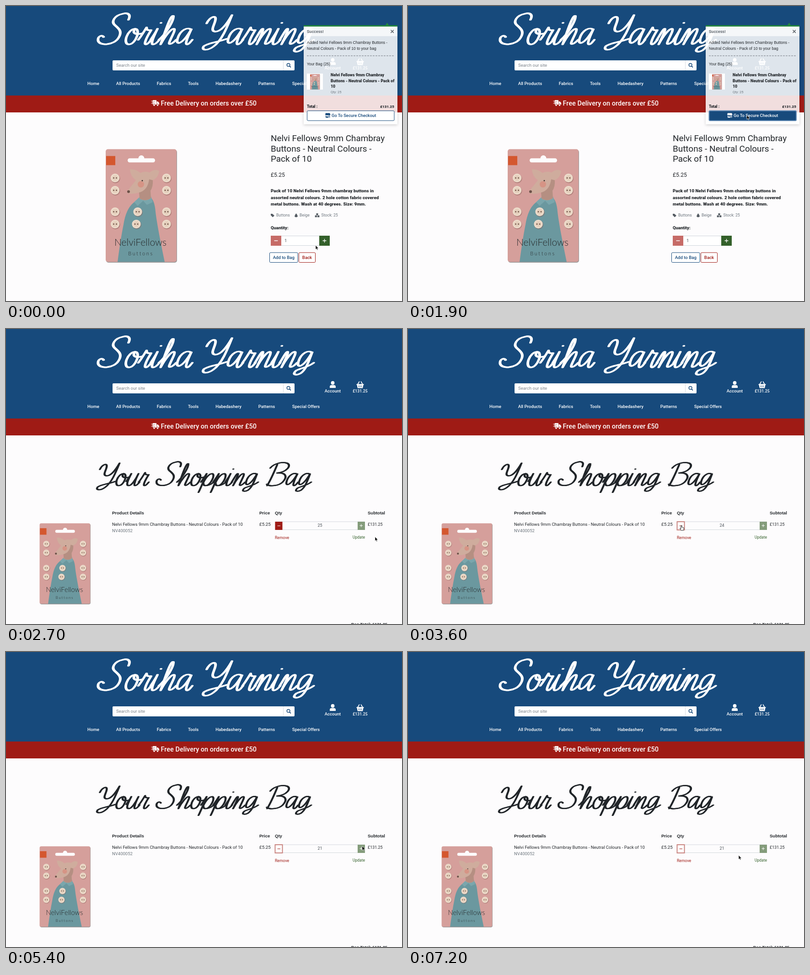
Recreate the animation shown at these times as an HTML page. Size 866x646 px, loop 7300 ms.

```html
<!DOCTYPE html>
<html lang="en">
<head>
<meta charset="utf-8">
<title>Shopping bag</title>
<style>
html, body { margin: 0; width: 100%; height: 100%; overflow: hidden; background: #fdfcfd; }
svg { display: block; font-family: Roboto, sans-serif; }
.sans { font-family: "Liberation Sans", Arial, sans-serif; }
.b { font-weight: 700; }
.x { font-weight: 800; }
.m { font-weight: 500; }
.mid { text-anchor: middle; }
.end { text-anchor: end; }
.script path { fill: none; stroke: currentColor; stroke-linecap: round; stroke-linejoin: round; }
.line { fill: none; stroke: currentColor; stroke-linecap: round; stroke-linejoin: round; }
#checkout { color: #174a7c; }
#checkout rect { fill: #fff; stroke: #174a7c; }
#checkout.hover { color: #fff; }
#checkout.hover rect { fill: #174a7c; }
#checkout.focus rect { stroke: #5d87b3; stroke-width: 2; }
#minus { color: #fff; }
#minus rect { fill: #9f1b15; }
#minus.hover { color: #9f1b15; }
#minus.hover rect { fill: #fff; stroke: #9f1b15; }
#minus.focus rect { stroke: #c98480; stroke-width: 2; }
</style>
</head>
<body>
<script>
const BLUE = '#174a7c', RED = '#9f1b15', GREEN = '#33602a', INK = '#212529', GREY = '#6c757d';
const BRAND = 'Nelvi Fellows';

const text = (x, y, size, str, cls = '', fill = INK) =>
  `<text x="${x}" y="${y}" font-size="${size}" class="${cls}" fill="${fill}">${str}</text>`;
const rect = (x, y, w, h, fill, extra = '') =>
  `<rect x="${x}" y="${y}" width="${w}" height="${h}" fill="${fill}" ${extra}/>`;
const line = (d, color, width = 1.3) =>
  `<path class="line" d="${d}" style="color:${color}" stroke-width="${width}"/>`;
const shape = (d, fill, extra = '') => `<path d="${d}" fill="${fill}" ${extra}/>`;
const group = (x, y, scale, body) => `<g transform="translate(${x} ${y}) scale(${scale})">${body}</g>`;

// Pen lettering: advance width and upright stroke, baseline at y = 0
const glyphs = {
  S: [48, 'M44-54C46-66 38-70 30-67C16-64 12-50 22-42C32-34 40-28 36-14C32 2 6 4 0-8C-4-18 4-22 8-16'],
  Y: [44, 'M-2-46C0-60 10-65 12-55C14-44 8-30 18-28C30-27 36-46 40-64C38-36 36-8 24 5C15 15 3 13 6 4C12-3 30-5 44-12'],
  B: [46, 'M14-60C12-36 10-16 6 0M0-50C6-64 24-68 36-64C50-58 42-38 20-36C42-38 48-24 40-10C34 0 14 4 4-4'],
  a: [30, 'M23-32C15-39 3-32 3-13C3 3 15 2 23-33C20-12 20 0 24 0C27 0 29-5 31-10'],
  o: [26, 'M14-34C-1-34-1 0 11 0C24 0 25-34 13-34C10-24 20-20 29-24'],
  n: [31, 'M0-10C3-20 5-34 8-34C11-34 8-14 6 0C9-18 16-34 21-34C27-34 20-10 21-3C22 2 28-2 32-10'],
  u: [30, 'M0-12C2-20 5-26 6-34C3-16 1 0 9 0C16 0 21-18 23-34C20-14 20 0 24 0C27 0 30-5 32-10'],
  r: [23, 'M0-10C4-20 6-30 8-37C9-30 14-31 18-31C15-20 11 0 17 0C20 0 22-6 24-10'],
  i: [15, 'M0-10C2-18 5-26 6-34C3-14 2 0 7 0C11 0 14-5 16-10M9-47h.1'],
  h: [31, 'M0-10C8-20 17-50 13-62C8-66 7-40 6 0C9-18 16-34 21-34C27-34 20-10 21-3C22 2 28-2 32-10'],
  p: [29, 'M0-10C3-20 6-28 7-34C5-8 4 6 2 19M6-8C8-24 14-34 20-34C30-32 25 0 14 0C9 0 8-3 7-6M14 0C20 0 26-4 31-10'],
  g: [30, 'M23-32C15-39 3-32 3-13C3 3 15 2 23-33C22-10 21 6 14 13C6 19-2 15 4 7C10 2 24 0 32-10'],
  ' ': [20, '']
};
function script(str, x, y, sx, sy, color) {
  let pen = 0, strokes = '';
  for (const c of str) {
    const [width, d] = glyphs[c];
    for (const dx of [0, 1.6]) strokes += `<path d="${d}" transform="translate(${pen + dx})"/>`;
    pen += width;
  }
  return `<g class="script" role="img" aria-label="${str}" style="color:${color}" stroke-width="3.3"
    transform="translate(${x} ${y}) scale(${sx} ${sy}) skewX(-15)">${strokes}</g>`;
}

const button = ([x, y]) =>
  `<circle cx="${x + 1}" cy="${y + 1.5}" r="10" fill="#8a5f58" opacity=".45"/>
   <circle cx="${x}" cy="${y}" r="9.6" fill="#eddccb"/><circle cx="${x}" cy="${y}" r="6.5" fill="#e4cfbc"/>
   <circle cx="${x - 3}" cy="${y}" r="1.5" fill="#75594c"/><circle cx="${x + 3}" cy="${y}" r="1.5" fill="#75594c"/>`;
const rows = [63, 90, 137, 164];
const buttons = [...rows.flatMap(y => [[20.5, y], [133, y]]), [70, 137], [67, 164]];
const card = `<g id="card">
  ${rect(1, 1.5, 155, 247, '#999', 'rx="5"')}${rect(0, 0, 155, 247, '#d59f9b', 'rx="5"')}
  ${rect(48, 20, 60, 9, '#fdfcfd', 'rx="4.5"')}<circle cx="78" cy="20" r="6.5" fill="#fdfcfd"/>
  ${rect(1, 15, 20, 20, '#d4572f')}
  ${shape('M26 247Q32 200 39 165Q44 132 60 118L76 106H98Q107 112 109 137Q112 165 129 247Z', '#6b989f')}
  ${shape('M62 116L75 104L99 103L103 116L90 122L82 113L70 124Z', '#7aa6ac')}
  ${shape('M53 44Q65 43 76 52Q86 47 96 51Q108 42 117 48Q115 63 103 68Q104 82 98 91L99 107Q87 116 74 108L73 95Q60 99 49 97Q46 92 50 88L66 68Q54 60 53 44Z', '#cfac9d')}
  ${shape('M103 68Q104 82 98 91L99 107Q87 116 74 108L73 95Q92 90 95 66Z', '#b58f82')}
  <circle cx="77" cy="77" r="7" fill="#d98a7b" opacity=".7"/><circle cx="50" cy="93" r="3" fill="#6d5149"/>
  <circle cx="80" cy="69" r="1.4" fill="#3b302d"/>
  ${buttons.map(button).join('')}
  <g style="font-family:Lato,sans-serif;font-weight:300">${text(76, 211, 21, BRAND.replace(' ', ''), 'mid', '#25282a')}
  <g letter-spacing="2.6">${text(77, 232, 11, 'Buttons', 'mid', '#25282a')}</g></g>
</g>`;
const cardAt = (x, y, scale) => `<use href="#card" transform="translate(${x} ${y}) scale(${scale})"/>`;

const truck = `${shape('M3 0H11V10H3ZM11.6 3H14L17 6V10H11.6Z', '#fff')}
  <circle cx="6" cy="11" r="2.3" fill="#fff" stroke="${RED}"/><circle cx="13.5" cy="11" r="2.3" fill="#fff" stroke="${RED}"/>
  ${line('M0 2H6M1 4.7H6M0 7.4H5', '#fff', 1)}${line('M4.5 3.3H7M4.5 6H6', RED, .7)}`;
const basket = shape('M0 6H16V8H15L13.6 15H2.4L1 8H0Z', '#fff') +
  line('M3 6L6 .8M13 6L10 .8', '#fff', 1.7) + line('M5 9.5V12.5M8 9.5V12.5M11 9.5V12.5', BLUE, 1);
const store = shape('M1 0H10L11.5 3.5Q11 5 9.5 5Q8.5 5 7.6 4.4Q5.8 5.6 4 4.4Q2 5.5 0 3.5ZM1 5.5H2.2V7.5H6.5V5.5H7.5V10H1ZM9 5.5H10.3V10H9Z', 'currentColor');

const nav = [['Home', 191], ['All Products', 267], ['Fabrics', 345.5], ['Tools', 409.5],
  ['Habedashery', 486.5], ['Patterns', 570], ['Special Offers', 656]];
const header = `
  ${rect(0, 0, 866, 196, BLUE)}${rect(0, 196, 866, 37, RED)}
  ${script('Soriha Yarning', 198, 84, 1.18, 1, '#fff')}
  ${rect(233, 119, 398, 22, '#fff', 'rx="2"')}${rect(606, 119, 1, 22, '#d8dde2')}
  ${text(241, 132.5, 9.5, 'Search our site', '', '#7b838b')}
  <circle cx="617.6" cy="129" r="3.3" fill="none" stroke="${BLUE}" stroke-width="1.5"/>${line('M620.2 131.6L622.4 133.8', BLUE, 1.8)}
  <circle cx="714.5" cy="118" r="3.9" fill="#fff"/>${shape('M708 129V126.5Q708 122.8 712 122.8H717Q721 122.8 721 126.5V129Z', '#fff')}
  ${group(766.5, 114.5, 1, basket)}
  ${text(714.5, 139.3, 9.5, 'Account', 'm mid', '#fff')}${text(774.5, 139.3, 8.8, '£131.25', 'm mid', '#fff')}
  ${nav.map(([label, x]) => text(x, 172.6, 9.6, label, 'm mid', '#fff')).join('')}
  ${group(318, 206, 1, truck)}${text(338.5, 218, 14.5, 'Free Delivery on orders over £50', 'm', '#fff')}`;

const panel = `
  ${rect(651, 45, 205, 214, '#fff', 'opacity=".86" filter="url(#shadow)"')}
  ${rect(651, 45, 205, 21, '#fff', 'opacity=".7"')}
  ${rect(651, 42, 205, 3, '#23863f')}${shape('M830 42L833.5 36.5L837 42Z', '#23863f')}
  ${text(658, 59, 8.4, 'Success!', 'sans b', '#5a6168')}${line('M842 53L847.4 58.4M847.4 53L842 58.4', '#62686e', 1.7)}
  ${text(658, 83, 8.5, `Added ${BRAND} 9mm Chambray Buttons -`, 'sans')}
  ${text(658, 95.5, 8.5, 'Neutral Colours - Pack of 10 to your bag', 'sans')}
  <path d="M658 109H849" stroke="#959ca4" stroke-width="1.5" stroke-dasharray="4 2"/>
  ${text(658, 130, 8.3, 'Your Bag (25)', 'sans')}
  ${rect(658, 148, 35, 35, '#fff')}${cardAt(665, 149, .137)}
  ${[`${BRAND} 9mm Chambray`, 'Buttons - Neutral Colours - Pack of', '10']
    .map((s, i) => text(710, 154.3 + i * 12.3, 8.75, s, 'x')).join('')}
  ${text(710, 190.5, 7.6, 'Qty: 25', '', GREY)}
  ${text(658, 222.7, 8.3, 'Total :', 'x')}${text(849, 222.7, 8.1, '£131.25', 'x end')}
  <g id="checkout">${rect(658.5, 229.5, 190.5, 21.5, '#fff', 'rx="2"')}
    ${group(698, 234.5, 1, store)}${text(712, 243.2, 9.4, 'Go To Secure Checkout', 'm', 'currentColor')}</g>`;

const product = `<g id="product">
  ${cardAt(218, 313.5, 1)}
  ${[`${BRAND} 9mm Chambray`, 'Buttons - Neutral Colours -', 'Pack of 10']
    .map((s, i) => text(579, 296.3 + i * 22.5, 18.9, s)).join('')}
  ${text(579, 374, 12.2, '£5.25')}
  ${[`Pack of 10 ${BRAND} 9mm chambray buttons in`, 'assorted neutral colours. 2 hole cotton fabric covered', 'metal buttons. Wash at 40 degrees. Size: 9mm.']
    .map((s, i) => text(579, 408.3 + i * 14.2, 9.75, s, 'x')).join('')}
  ${shape('M579 455H582.5L587 459L583.3 462.5L579 458.3Z', '#555c63')}
  ${shape('M634.5 454Q641 462.5 634.5 462.5Q628 462.5 634.5 454Z', '#555c63')}
  ${shape('M678.5 454H682.5V458H678.5ZM675.7 458.6H680V462.6H675.7ZM681 458.6H685.4V462.6H681Z', '#555c63')}
  ${text(591, 461.3, 8.6, 'Buttons', '', GREY)}${text(642, 461.3, 8.8, 'Beige', '', GREY)}${text(689.5, 461.3, 8.8, 'Stock: 25', '', GREY)}
  ${text(579, 489, 9.4, 'Quantity:', 'x')}
  ${rect(579.5, 503.5, 128, 21, '#fff', 'stroke="#ced4da"')}
  ${rect(579, 503, 23, 22, '#c66b67')}${rect(685, 503, 23, 22, GREEN)}
  ${line('M587 514H594', '#fff')}${line('M693 514H700M696.5 510.5V517.5', '#fff')}
  ${text(609, 517, 9.5, '1', '', '#495057')}
  ${rect(576.5, 540, 61.5, 21.5, '#fff', `rx="2" stroke="${BLUE}"`)}${text(607.3, 553.5, 9.6, 'Add to Bag', 'm mid', BLUE)}
  ${rect(640.5, 540, 36, 21.5, '#fff', `rx="2" stroke="${RED}"`)}${text(658.5, 553.5, 9.6, 'Back', 'm mid', RED)}
  ${panel}</g>`;

const bag = `<g id="bag">
  ${script('Your Shopping Bag', 195, 343, .92, .77, INK)}
  ${cardAt(73.5, 425.5, .714)}
  ${[['Product Details', 232], ['Price', 554], ['Qty', 588], ['Subtotal', 791]]
    .map(([s, x]) => text(x, 405.5, 9.5, s, 'sans b')).join('')}
  ${text(232, 431.3, 9.5, `${BRAND} 9mm Chambray Buttons - Neutral Colours - Pack of 10`)}
  ${text(232, 445.3, 9.5, 'NV400052', '', GREY)}
  ${text(554, 431.3, 9.8, '£5.25')}${text(791, 431.3, 8.9, '£131.25')}
  ${rect(589, 422, 195, 17.5, '#fdfcfd', 'stroke="#d3d8dd"')}
  ${rect(769, 422, 16, 18, '#849c7b')}${line('M774 430.5H779.6M776.8 427.7V433.3', '#fff', 1.1)}
  <text id="qty" class="mid" x="686.5" y="433.3" font-size="9" fill="#495057"></text>
  <g id="minus">${rect(588.5, 422, 16, 18, RED)}<path class="line" d="M594 431H599.5" stroke-width="1.1"/></g>
  ${text(588, 460, 8.7, 'Remove', '', RED)}${text(785, 459.3, 8.5, 'Update', 'end', GREEN)}
  ${text(834, 649.5, 9.1, 'Bag Total: £131.25', 'sans b end')}</g>`;

const arrow = shape('M0 0V9.2L2.1 7.3L3.5 10.4L5 9.7L3.6 6.8H6.4Z', '#000', 'id="arrow" stroke="#fff" stroke-width=".7"');
const hand = shape('M-1 .8Q0-.6 1 .8V4.2Q2 3.6 2.5 4.6Q3.6 4 4 5Q5.3 4.7 5.2 6V8.2Q5 9.6 4.2 11H-.8Q-2 9-3.3 7Q-3.6 5.6-2.3 6L-1 7Z',
  '#fff', 'id="hand" stroke="#111" stroke-width=".9"');

document.body.innerHTML = `<svg width="866" height="646" viewBox="0 0 866 646">
  <defs>${card}<filter id="shadow" x="-10%" y="-10%" width="120%" height="120%">
    <feDropShadow dx="0" dy="2" stdDeviation="3" flood-opacity=".2"/></filter></defs>
  ${rect(0, 0, 866, 646, '#fdfcfd')}${header}${product}${bag}<g id="cursor">${arrow}${hand}</g></svg>`;

const LOOP = 7300, STEP = 100, CHECKOUT_CLICK = 1800, PAGE_CHANGE = 2000;
const minusClicks = [3500, 3700, 4000, 4200];
const path = [[0, 677, 524], [900, 738, 246], [1400, 738, 246], [1800, 741, 239], [2000, 741, 239],
  [2700, 807, 455], [2800, 807, 455], [3400, 598, 430], [4300, 598, 430], [4800, 778, 426], [5400, 779, 425],
  [5700, 784, 428], [6000, 800, 440], [6400, 773, 447], [7200, 723, 445]];
const $ = id => document.getElementById(id);
const show = (id, on) => $(id).setAttribute('display', on ? 'inline' : 'none');

function cursorAt(t) {
  const i = Math.max(1, path.findIndex(p => p[0] >= t));
  const [t0, x0, y0] = path[i - 1], [t1, x1, y1] = path[i];
  const k = (t - t0) / (t1 - t0), e = k * k * (3 - 2 * k);
  return [x0 + (x1 - x0) * e, y0 + (y1 - y0) * e];
}

function draw(now) {
  const t = Math.floor(now % LOOP / STEP) * STEP;
  const [x, y] = cursorAt(t);
  const over = (l, top, r, b) => x >= l && x <= r && y >= top && y <= b;
  const onBag = t >= PAGE_CHANGE;
  const onCheckout = !onBag && over(658, 229, 849, 251);
  const onMinus = onBag && over(588, 421, 605, 441);
  const clicked = t >= CHECKOUT_CLICK, minusFocus = t >= minusClicks[0];

  show('product', !onBag);
  show('bag', onBag);
  $('checkout').classList.toggle('hover', onCheckout);
  $('checkout').classList.toggle('focus', clicked);
  $('minus').classList.toggle('hover', onMinus || minusFocus);
  $('minus').classList.toggle('focus', minusFocus);
  $('qty').textContent = 25 - minusClicks.filter(c => t >= c).length;

  const pointing = onMinus || (onCheckout && !clicked);
  show('hand', pointing);
  show('arrow', !pointing);
  $('cursor').setAttribute('transform', `translate(${x} ${y})`);
  requestAnimationFrame(() => draw(performance.now() - start));
}
const start = performance.now();
draw(0);
</script>
</body>
</html>
```
